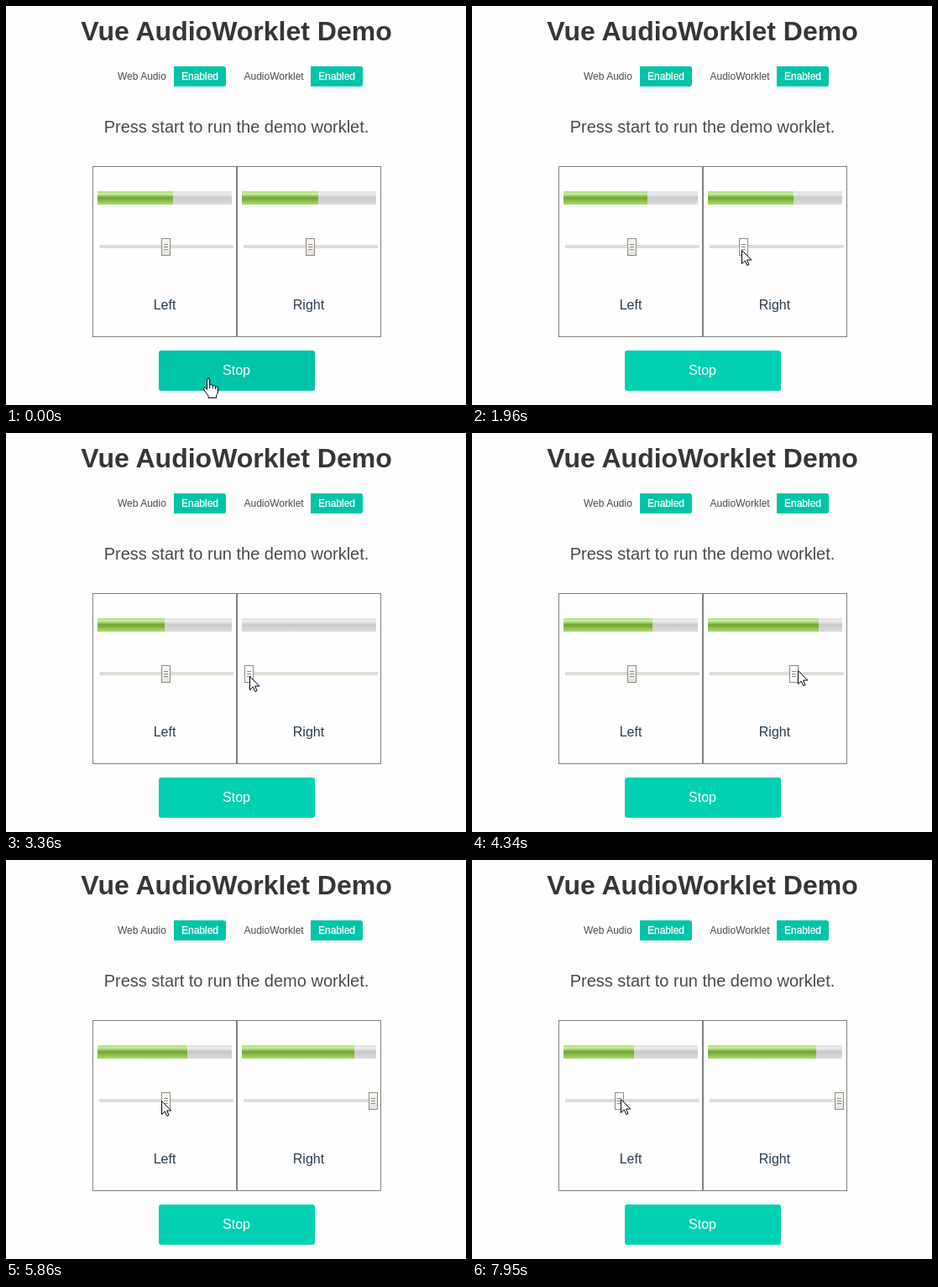
An HTML page that plays this animation: 548 px wide and 476 px high, repeating every 8000 ms.

```html
<!DOCTYPE html>
<html lang="en">
<head>
<meta charset="utf-8">
<title>Vue AudioWorklet Demo</title>
<style>
  html, body { margin: 0; width: 100%; height: 100%; overflow: hidden; background: #fefefe; }
  svg { position: absolute; left: 0; top: 0; display: block; }
  text { font-family: "Liberation Sans", Arial, sans-serif; fill: #4a4a4a; }
  .title { font-size: 32px; font-weight: 700; fill: #363636; }
  .lead { font-size: 20px; }
  .small { font-size: 12px; }
  .label { font-size: 16px; fill: #2c3e50; }
  .mid { text-anchor: middle; }
  .white { fill: #fff; }
  .tag { stroke: #fff; stroke-width: .3px; }
  .cell { fill: none; stroke: #808080; }
  .track { fill: #e0dcd6; }
  .thumb { fill: url(#knob); stroke: #8e8a82; }
  .thumb.hover { fill: #fdfdfb; }
  .pointer { fill: #fff; stroke: #000; stroke-linejoin: round; }
</style>
</head>
<body>
<svg width="548" height="476" viewBox="0 0 548 476">
  <defs>
    <linearGradient id="empty" x2="0" y2="1">
      <stop offset="0" stop-color="#ddd"/><stop offset=".2" stop-color="#eee"/>
      <stop offset=".45" stop-color="#ccc"/><stop offset=".55" stop-color="#ccc"/>
      <stop offset="1" stop-color="#ddd"/>
    </linearGradient>
    <linearGradient id="full" x2="0" y2="1">
      <stop offset="0" stop-color="#ad7"/><stop offset=".2" stop-color="#cea"/>
      <stop offset=".45" stop-color="#7a3"/><stop offset=".55" stop-color="#7a3"/>
      <stop offset="1" stop-color="#ad7"/>
    </linearGradient>
    <linearGradient id="knob" x2="0" y2="1">
      <stop offset="0" stop-color="#f8f7f4"/><stop offset="1" stop-color="#e4e2dc"/>
    </linearGradient>
    <g id="tag">
      <path d="M0 0H59a3 3 0 0 1 3 3V21a3 3 0 0 1-3 3H0z" fill="#00c4a7"/>
      <text class="small white tag" x="9" y="16">Enabled</text>
    </g>
    <g id="channel">
      <rect class="cell" x=".5" y=".5" width="171" height="203"/>
      <rect x="6" y="30" width="160" height="16" fill="url(#empty)"/>
      <rect class="track" x="8" y="94" width="160" height="4" rx="1"/>
    </g>
    <g id="grip">
      <rect x="-5" y="-10" width="10" height="20"/>
      <path d="M-2.500-3h5M-2.500 0h5M-2.500 3h5" fill="none"/>
    </g>
  </defs>

  <text class="title mid" x="274.500" y="41">Vue AudioWorklet Demo</text>
  <text class="small" x="133" y="88">Web Audio</text>
  <use href="#tag" x="200" y="72"/>
  <text class="small" x="283.500" y="88">AudioWorklet</text>
  <use href="#tag" x="363" y="72"/>
  <text class="lead mid" x="274.500" y="151">Press start to run the demo worklet.</text>

  <use href="#channel" x="103" y="191"/>
  <use href="#channel" x="275" y="191"/>
  <rect id="levelL" x="109" y="221" width="90" height="16" fill="url(#full)"/>
  <rect id="levelR" x="281" y="221" width="91" height="16" fill="url(#full)"/>
  <use class="thumb" id="thumbL" href="#grip"/>
  <use class="thumb" id="thumbR" href="#grip"/>
  <text class="label mid" x="189" y="362">Left</text>
  <text class="label mid" x="360.500" y="362">Right</text>

  <rect id="button" x="182" y="411" width="186" height="48" rx="3"/>
  <text class="label mid white" x="274.500" y="440">Stop</text>

  <path class="pointer" id="arrow" d="M.5.5V16.500L4.300 13 6.800 18.500 9 17.500 6.600 12H11.800z"/>
  <g class="pointer" id="hand">
    <path d="M-1.500 2Q-1.500.5 0 .5T1.700 2V8Q4.500 6.500 5.200 9 7.800 7.800 8.500 10 11.500 9.300 11.500 12V16Q11.500 18.500 9.500 20.500V23.500H0V21Q-2 18.500-4.500 15-6.500 11.500-5 11-3.500 10.500-1.500 13.500z"/>
    <path d="M1.700 8v4M5.200 9v3.500M8.500 10v3" fill="none"/>
  </g>
</svg>
<script>
const LOOP = 8000, STEP = 139.4; // the screen refreshes once per STEP ms
const LAG = 0.3;                  // thumbs trail the pointer, in steps

// key points in steps: pointer [step, x, y], meter levels [step, width]
const path = [[0, 241, 444], [2, 245, 440], [6, 345, 310], [8, 362, 291], [9, 362, 291],
  [14, 321, 291], [18, 288, 291], [23, 288, 290], [24, 290, 290], [29, 356, 285], [31, 388, 283],
  [32, 411, 283], [35, 461, 309], [40, 215, 286], [42, 185, 287], [44, 185, 287], [48, 124, 288],
  [51, 110, 288], [53, 114, 288], [56, 170, 285], [57, 177, 285]];
const left = { id: "L", rest: 190, min: 116, from: 45, to: 57,
  level: [[0, 90], [14, 100], [24, 80], [31, 106], [42, 107], [46, 85], [50, 0], [52, 0], [57, 84]] };
const right = { id: "R", rest: 362, min: 289, from: 9, to: 34,
  level: [[0, 91], [14, 102], [16, 56], [21, 0], [24, 0], [31, 132], [42, 134], [51, 131], [57, 129]] };

const $ = id => document.getElementById(id);
const clamp = (v, lo, hi) => Math.min(hi, Math.max(lo, v));

// value between two key points, and how far it is from one to the next
function sample(keys, t, col = 1) {
  const i = clamp(keys.findIndex(k => k[0] > t), 1, keys.length - 1);
  const a = keys[i - 1], b = keys[i];
  const part = t >= keys[keys.length - 1][0] ? 1 : (t - a[0]) / (b[0] - a[0]);
  return { value: a[col] + (b[col] - a[col]) * part, part };
}

function at(keys, t, col) {
  const last = keys[keys.length - 1];
  return t >= last[0] ? { value: last[col || 1], part: 1 } : sample(keys, t, col);
}

function noise(seed) {
  const n = Math.sin(seed * 12.9898) * 43758.5453;
  return (n - Math.floor(n)) * 2 - 1;
}

function place(id, x, y) {
  $(id).setAttribute("transform", `translate(${x} ${y})`);
}

function drawChannel(ch, step, x, y) {
  // the sound flickers around its mean level
  const { value, part } = at(ch.level, step);
  const flicker = noise(step + ch.rest) * 12 * Math.sin(Math.PI * part) * Math.min(1, value / 60);
  $("level" + ch.id).setAttribute("width", Math.round(value + flicker));

  const drag = at(path, Math.min(step, ch.to) - LAG).value;
  const pos = step < ch.from ? ch.rest : Math.round(clamp(drag, ch.min, ch.min + 148));
  place("thumb" + ch.id, pos + 0.5, 287.5);
  const hover = Math.abs(x - pos) < 7 && Math.abs(y - 287) < 11;
  $("thumb" + ch.id).classList.toggle("hover", hover);
}

function draw(step) {
  const x = Math.round(at(path, step).value), y = Math.round(at(path, step, 2).value);
  const onButton = y >= 411;
  place("hand", x, y);
  place("arrow", x, y);
  $("hand").style.display = onButton ? "" : "none";
  $("arrow").style.display = onButton ? "none" : "";
  $("button").setAttribute("fill", onButton ? "#00c4a7" : "#00d1b2");
  drawChannel(left, step, x, y);
  drawChannel(right, step, x, y);
}

function tick() {
  draw(Math.floor(performance.now() % LOOP / STEP));
  requestAnimationFrame(tick);
}
tick();
</script>
</body>
</html>
```
